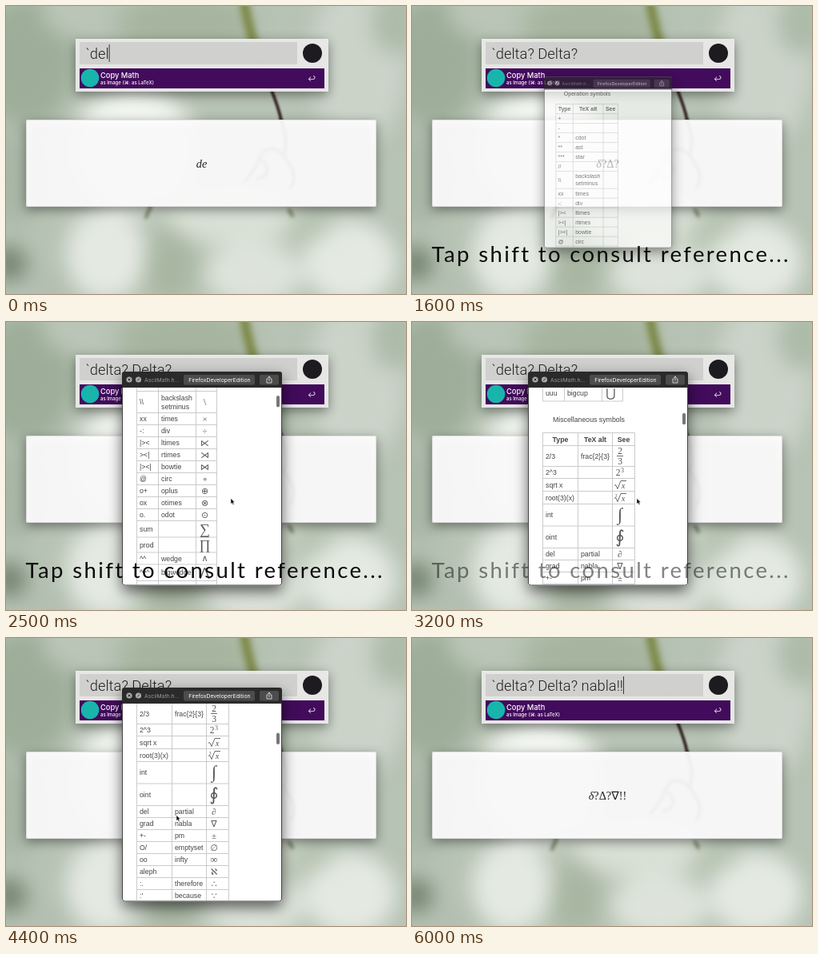
Animation of 500 by 360 pixels, one loop 6.1 s. Source, as an HTML page:

```html
<!DOCTYPE html>
<html lang="en">
<head>
<meta charset="utf-8">
<title>Math input</title>
<style>
  html, body { margin: 0; width: 100%; height: 100%; overflow: hidden; background: #b9c5b7; }
  svg { display: block; width: 500px; height: 360px; }
  .soft { filter: blur(13px); }
  .panel { filter: drop-shadow(0 4px 7px rgba(0,0,0,.45)); }
  .window { filter: drop-shadow(0 7px 9px rgba(0,0,0,.6)); }
  .ui { font-family: Inter, sans-serif; fill: #fff; }
  .query { font: 300 18.4px Roboto, sans-serif; fill: #222; white-space: pre; }
  .math { font: 14.3px "Liberation Serif", serif; fill: #222; text-anchor: middle; }
  .page { font: 8.75px "Liberation Sans", Arial, sans-serif; fill: #444; }
  .see { font-family: "Liberation Serif", "DejaVu Sans", serif; text-anchor: middle; fill: #555; }
  .caption { font: 27.5px Lato, sans-serif; letter-spacing: 2.37px; fill: #0b0b0b; }
</style>
</head>
<body>
<svg viewBox="0 0 500 360" xmlns="http://www.w3.org/2000/svg">
  <defs>
    <clipPath id="view"><rect x="146" y="82" width="198" height="246"/></clipPath>
  </defs>

  <rect width="500" height="360" fill="#b7c3b4"/>
  <g class="soft">
    <ellipse cx="25" cy="70" rx="60" ry="80" fill="#9dad99"/>
    <ellipse cx="85" cy="10" rx="40" ry="28" fill="#bac5b7"/>
    <ellipse cx="225" cy="25" rx="85" ry="45" fill="#a7b5a0"/>
    <ellipse cx="440" cy="70" rx="60" ry="105" fill="#cbd3c9"/>
    <ellipse cx="485" cy="20" rx="28" ry="40" fill="#adbba9"/>
    <ellipse cx="160" cy="180" rx="80" ry="75" fill="#f2f5f0"/>
    <ellipse cx="10" cy="215" rx="35" ry="60" fill="#a8b6a6"/>
    <ellipse cx="125" cy="310" rx="50" ry="58" fill="#e4e9e2"/>
    <ellipse cx="285" cy="260" rx="85" ry="40" fill="#d8dfd4"/>
    <ellipse cx="205" cy="325" rx="32" ry="45" fill="#a8b6a2"/>
    <ellipse cx="310" cy="335" rx="62" ry="40" fill="#dde3da"/>
    <ellipse cx="430" cy="320" rx="58" ry="52" fill="#e4e9e2"/>
    <ellipse cx="380" cy="272" rx="28" ry="20" fill="#b7c4b2"/>
    <ellipse cx="4" cy="322" rx="22" ry="22" fill="#72816f"/>
    <ellipse cx="50" cy="350" rx="30" ry="20" fill="#b2beb0"/>
  </g>
  <g fill="none" stroke-linecap="round">
    <path d="M297 -8C301 18 308 45 322 82" stroke="#78853f" stroke-width="11" style="filter:blur(4px)"/>
    <path d="M329 98C335 113 341 127 344 143" stroke="#3b2a29" stroke-width="4" style="filter:blur(.8px)"/>
    <g stroke="#34342f" stroke-width="4" style="filter:blur(1.5px)">
      <path d="M344 143C350 160 352 174 347 187C337 176 324 175 317 189C313 202 307 211 298 219"/>
      <path d="M347 187C359 202 364 214 356 227M319 192C330 202 329 213 314 216"/>
    </g>
    <path d="M181 250L175 264M354 255L358 262" stroke="#768463" stroke-width="4" style="filter:blur(2px)"/>
  </g>

  <rect class="panel" x="25" y="142" width="438" height="109" rx="2" fill="#fff" fill-opacity=".93"/>
  <rect x="25.5" y="142.5" width="437" height="108" rx="2" fill="none" stroke="#888" stroke-opacity=".25"/>
  <text id="math" class="math" x="244.5" y="201.5"></text>

  <g class="ui">
    <rect class="panel" x="87" y="41" width="316" height="66" fill="#ebebea" fill-opacity=".96"/>
    <rect x="92" y="45" width="272" height="28" fill="#d0d0ce"/>
    <circle cx="383" cy="59" r="12" fill="#1d1a20"/>
    <rect x="92" y="78" width="306" height="25" fill="#420b5c"/>
    <circle cx="105" cy="90" r="11.3" fill="#18b5ac"/>
    <text x="118" y="89.5" font-size="9.3" font-weight="500">Copy Math</text>
    <text x="118" y="98" font-size="6" font-weight="500">as Image (⌘: as LaTeX)</text>
    <text x="377" y="93.5" font-size="9">↩</text>
  </g>
  <text id="query" class="query" x="99.5" y="66.4"></text>
  <rect id="caret" y="48" width="1" height="22" fill="#333"/>

  <g id="popup">
    <rect class="window" x="145" y="62" width="200" height="267.5" rx="3" fill="#fff"/>
    <g class="page" clip-path="url(#view)">
      <g id="page"></g>
      <rect id="bar" x="338" width="4" height="14.5" rx="2" fill="#777"/>
    </g>
    <rect x="145.5" y="62.5" width="199" height="266.5" rx="3" fill="none" stroke="#444"/>
    <path d="M145 82V65Q145 62 148 62H342Q345 62 345 65V82Z" fill="#2a2a2b"/>
    <circle cx="154" cy="72" r="3.6" fill="#aaa"/>
    <circle cx="165.5" cy="72" r="3.6" fill="#aaa"/>
    <path d="M152.6 70.6l2.8 2.8m0-2.8l-2.8 2.8M164.1 73.4l2.8-2.8" stroke="#2a2a2b"/>
    <rect x="222" y="66" width="89" height="12.5" rx="2" fill="#4c4c4d"/>
    <rect x="317" y="66" width="24" height="12.5" rx="2" fill="#4c4c4d"/>
    <path d="M327.5 71h-1.5v5h6v-5h-1.5M329 74v-6m-1.8 1.8l1.8-1.8l1.8 1.8" fill="none" stroke="#eee" stroke-width=".8"/>
    <g class="ui">
      <text x="173" y="74.6" font-size="6.8" fill="#9a9a9a">AsciiMath.h...</text>
      <text x="267" y="74.5" font-size="6.85" text-anchor="middle">FirefoxDeveloperEdition</text>
    </g>
  </g>
  <path id="mouse" d="M0 0V7L1.6 5.5L2.8 8L4 7.4L2.9 5H5Z" fill="#000" stroke="#fff" stroke-width=".5"/>
  <text id="caption" class="caption" x="24.5" y="319.5">Tap shift to consult reference...</text>
</svg>

<script>
const LOOP = 6100, STEP = 100;
const QUERY = "`delta? Delta? nabla!!";
const FIRST = 14;
const $ = id => document.getElementById(id);

// Rows: type; TeX name; symbol; height (15 by default); symbol size
const OPS = String.raw`+;;+
-;;−
*;cdot;⋅
**;ast;∗
***;star;⋆
//;;/
\\;backslash/setminus;\;27;13
xx;times;×
-:;div;÷
|><;ltimes;⋉
><|;rtimes;⋊
|><|;bowtie;⋈
@;circ;∘
o+;oplus;⊕
ox;otimes;⊗
o.;odot;⊙
sum;;∑;20.5;18
prod;;∏;19;17
^^;wedge;∧
^^^;bigwedge;⋀;20.5;15
vv;vee;∨
vvv;bigvee;⋁;20.5;15
nn;cap;∩
nnn;bigcap;⋂;20.5;15
uu;cup;∪
uuu;bigcup;⋃;20.5;15`;

const MISC = `2/3;frac{2}{3};frac;26
2^3;;power
sqrt x;;root;16
root(3)(x);;cube;16
int;;∫;27.5;22
oint;;∮;27.5;22
del;partial;∂
grad;nabla;∇
+-;pm;±
O/;emptyset;∅
oo;infty;∞;15;13
aleph;;ℵ
:.;therefore;∴
:';because;∵`;

const esc = s => s.replace(/&/g, "&amp;").replace(/</g, "&lt;").replace(/>/g, "&gt;");
const text = (x, y, s, attrs = "") => `<text x="${x}" y="${y}" ${attrs}>${esc(s)}</text>`;
const line = (x1, y1, x2, y2, color = "#cbcbcf", w = 1) =>
  `<path d="M${x1} ${y1}L${x2} ${y2}" stroke="${color}" stroke-width="${w}" fill="none"/>`;
const sign = (x, y, s, size, style = "normal") =>
  text(x, y, s, `font-size="${size}" font-style="${style}"`);

const radical = (x, y) =>
  `<path d="M${x - 7} ${y + 1}l1.5 -1l2.5 5l4 -10h7" fill="none" stroke="#444" stroke-width=".8"/>`
  + sign(x + 4, y + 4, "x", 10.5, "italic");

const special = {
  frac: (x, y) => sign(x, y - 3, "2", 11.5) + line(x - 4, y, x + 4, y, "#444", .8) + sign(x, y + 10.5, "3", 11.5),
  power: (x, y) => sign(x - 2.5, y + 4, "2", 11.5) + sign(x + 3, y, "3", 8),
  root: radical,
  cube: (x, y) => radical(x, y) + sign(x - 5, y - 1, "3", 5.5)
};

function table(data, top, headHeight, [a, b, c, d], center) {
  const head = (p, q, s) =>
    text((p + q) / 2, top + headHeight / 2 + 3, s, 'font-weight="bold" text-anchor="middle"');
  let y = top + headHeight, see = "";
  let out = line(a, top, d, top) + line(a, y, d, y)
    + head(a, b, "Type") + head(b, c, "TeX alt") + head(c, d, "See");
  for (const row of data.split("\n")) {
    const [type, alt, symbol, h = 15, size = 11] = row.split(";");
    const m = y + h / 2;
    out += text(a + 3.5, m + 3, type);
    const names = alt.split("/");
    names.forEach((s, i) => out += text(b + 3.5, m + 3 + 11 * (i - (names.length - 1) / 2), s));
    see += special[symbol] ? special[symbol](center, m) : sign(center, m + size * .32, symbol, size);
    y += +h;
    out += line(a, y, d, y);
  }
  for (const x of [a, b, c, d]) out += line(x, top, x, y);
  return out + `<g class="see">${see}</g>`;
}

$("page").innerHTML =
  text(176, 91, "Operation symbols") +
  `<g id="bare">${table(OPS, 104.5, 15, [163.5, 190.5, 237.5, 260.5], 249)}</g>` +
  `<g id="full">${table(OPS, 104.5, 15, [163.5, 190.5, 237.5, 263.5], 248.5)}</g>` +
  text(176, 579, "Miscellaneous symbols") +
  table(MISC, 592.5, 16, [163.5, 207.5, 250.5, 278.5], 260);
$("bare").querySelector(".see").remove();

// Keys are [time, value]
const tracks = {
  typed: [[0, 4], [1000, FIRST], [4900, FIRST], [5700, QUERY.length]],
  caption: [[1100, 0], [1200, .13], [1600, 1], [3000, 1], [3200, .5], [3400, 0]],
  open: [[1400, 0], [1700, 1], [4600, 1], [4900, 0]],
  scroll: [[2200, 0], [2350, 35], [2500, 123], [2800, 365], [3000, 440], [3150, 454], [3400, 454], [3600, 505], [3800, 527]],
  glide: [[3800, 0], [3900, .15], [4100, .85], [4200, 1]]
};

function at(keys, t) {
  if (t <= keys[0][0]) return keys[0][1];
  for (let i = 1; i < keys.length; i++) {
    const [t0, v0] = keys[i - 1], [t1, v1] = keys[i];
    if (t <= t1) return v0 + (v1 - v0) * (t - t0) / (t1 - t0);
  }
  return keys[keys.length - 1][1];
}

const mathMarkup = s => (s.match(/delta|Delta|nabla|del|\S/g) || []).map(token => {
  const glyph = { delta: "δ", Delta: "Δ", nabla: "∇", del: "∂" }[token] || token;
  return /[A-Za-zδ]/.test(glyph) ? `<tspan font-style="italic">${glyph}</tspan>` : glyph;
}).join("");

const show = (id, on) => $(id).setAttribute("visibility", on ? "visible" : "hidden");

function render(t) {
  const typed = Math.round(at(tracks.typed, t));
  const settled = t < STEP ? typed - 1 : Math.round(at(tracks.typed, t - STEP));
  $("query").textContent = QUERY.slice(0, typed);
  $("math").innerHTML = mathMarkup(QUERY.slice(1, settled));
  $("caret").setAttribute("x", 99.5 + $("query").getComputedTextLength());
  show("caret", t < 1100 || t >= 4900);

  const open = at(tracks.open, t), k = .4 + .6 * open;
  $("popup").setAttribute("opacity", open);
  $("popup").setAttribute("transform", `translate(245 195) scale(${k}) translate(-245 -195)`);

  const scroll = at(tracks.scroll, t);
  $("page").setAttribute("transform", `translate(0 ${-scroll})`);
  $("bar").setAttribute("y", 84 + scroll * .0655);
  show("bar", t >= 2200);
  show("bare", t < 2000);
  show("full", t >= 2000);

  const glide = at(tracks.glide, t);
  $("mouse").setAttribute("transform", `translate(${281 - 68 * glide} ${220.5 + glide})`);
  show("mouse", t >= 2200 && t < 4900);
  $("caption").setAttribute("opacity", at(tracks.caption, t));
}

const start = performance.now();
let last = -1;
function tick() {
  const t = Math.floor((performance.now() - start) % LOOP / STEP) * STEP;
  if (t !== last) render(last = t);
  requestAnimationFrame(tick);
}
tick();
</script>
</body>
</html>
```
